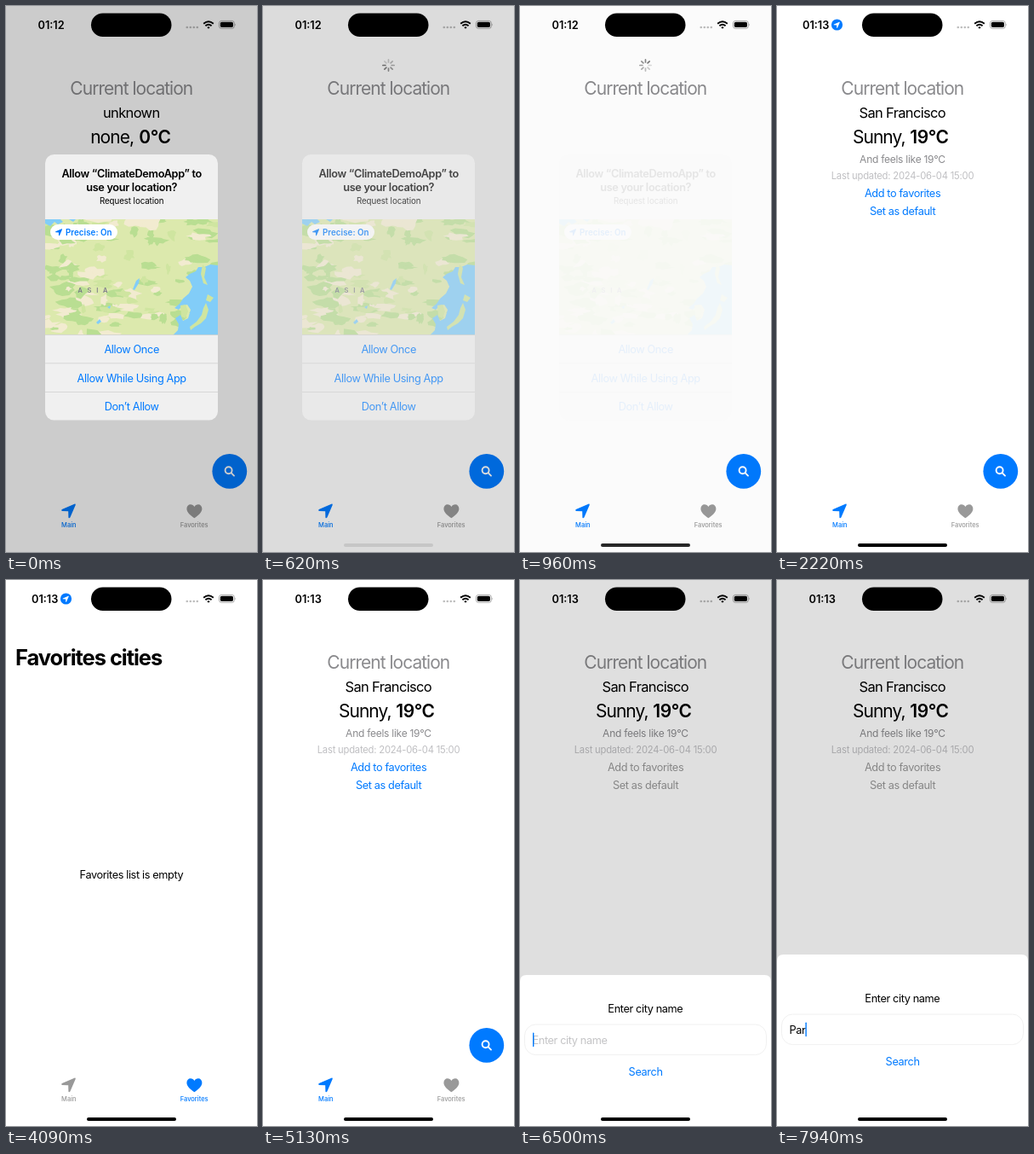
An HTML page for the animation above (8 s loop, 295x640 px).

```html
<!DOCTYPE html>
<html lang="en">
<head>
<meta charset="utf-8">
<title>Weather app</title>
<style>
html, body { margin: 0; width: 100%; height: 100%; overflow: hidden; background: #fff; }
svg { display: block; width: 100vw; height: 100vh; }
text { font-family: Inter, "Liberation Sans", sans-serif; font-optical-sizing: none; white-space: pre; }
</style>
</head>
<body>
<svg id="stage" viewBox="0 0 295 640" xmlns="http://www.w3.org/2000/svg"></svg>
<script>
const LOOP = 8000;
const BLUE = [0, 122, 255], GREY = [153, 153, 153];
const $ = id => document.getElementById(id);
const rgb = c => `rgb(${c.map(Math.round)})`;
const mix = (a, b, k) => rgb(a.map((v, i) => v + (b[i] - v) * k));
const clamp = v => Math.max(0, Math.min(1, v));

// Text styles: size, letter spacing, weight
const STYLE = {
  title: [21, -0.98, 400],
  titleBold: [21, -0.4, 600],
  city: [16.5, -0.66, 400],
  body: [12.76, -0.39, 400],
  bodyBold: [12.76, -0.33, 600],
  callout: [12, -0.26, 400],
  sub: [11.26, -0.22, 400],
  foot: [9.76, -0.08, 400],
  pill: [9.76, 0.05, 600],
  tab: [7.5, 0, 500],
  clock: [12.76, 0, 600],
  large: [25.5, -1.05, 700]
};

function text(style, x, y, str, { fill = '#000', anchor = 'middle', id = '' } = {}) {
  const [size, gap, weight] = STYLE[style];
  return `<text ${id && `id="${id}"`} x="${x}" y="${y}" font-size="${size}" letter-spacing="${gap}" ` +
    `font-weight="${weight}" text-anchor="${anchor}" fill="${fill}">${str}</text>`;
}
const left = (style, x, y, str, opts) => text(style, x, y, str, { anchor: 'start', ...opts });
const arrow = (x, y, k, fill, id = '') =>
  `<path ${id && `id="${id}"`} transform="translate(${x} ${y}) scale(${k})" fill="${fill}" ` +
  `d="M7-8.3Q8.7-8.7 8.3-7L2 7.6Q.7 9.2 0 7.4L-.2.2L-7.6 0Q-9-.8-7.6-2Z"/>`;

function seeded(s) {
  return () => (s = (s * 16807) % 2147483647) / 2147483647;
}

function terrain() {
  const rnd = seeded(417);
  let out = '';
  for (let i = 0; i < 130; i++) {
    const x = 46 + rnd() * 203, y = 250 + rnd() * 135;
    const cream = y > 345 && x < 150 ? 0.7 : 0.22;
    const fill = rnd() < cream ? '#f2ebd0' : rnd() < 0.75 ? '#b9de92' : '#cfe5a0';
    const rx = 3 + rnd() * 13, ry = 2 + rnd() * 6;
    const pts = [];
    for (let a = 0; a < 12; a++) {
      const r = 0.5 + rnd() * 0.7, q = a * Math.PI / 6;
      pts.push((x + Math.cos(q) * rx * r).toFixed(1) + ',' + (y + Math.sin(q) * ry * r).toFixed(1));
    }
    out += `<polygon points="${pts.join(' ')}" fill="${fill}"/>`;
  }
  return out;
}

function mapView() {
  return `<g clip-path="url(#mapClip)">
    <rect x="46" y="250" width="203" height="135.5" fill="#dce9ad"/>${terrain()}
    <g fill="#82cdf8">
      <path d="M249 304L240 303 233 306 226 306 223 311 216 314 211 318 216 322 219 329 215 337 208 343 204 349
        198 354 203 356 207 352 213 350 217 356 214 366 208 369 205 362 199 366 203 373 202 380 196 386H249Z"/>
      <path d="M46 250H64L67 253 61 256 57 253 52 258 46 255ZM74 250H82L79 253Z"/>
      <path d="M149 332L153 322 157 319 156 325 151 333ZM106 371L110 367 112 370 108 373ZM119 353L123 351 122 355Z"/>
    </g>
    <path d="M237 338L244 342 240 347 235 345ZM235 348L238 356 235 366 229 372 222 376 217 380 216 376 224 370 230 362 232 354Z" fill="#cfe5a0"/>
    <path d="M231 303L235 307 233 318 237 327 232 325 229 314Z" fill="#cfe5a0"/>
    <path d="M205 351L211 350 214 358 211 366 206 364Z" fill="#cfe5a0"/>
    ${left('tab', 84.5, 335.5, 'A S I A', { fill: '#6f6a86' }).replace('letter-spacing="0"', 'letter-spacing="1.9"')}
    <rect x="52" y="256" width="79" height="18" rx="9" fill="#fff"/>
    ${arrow(62, 265.3, 0.48, rgb(BLUE))}
    ${left('pill', 70, 268.7, 'Precise: On', { fill: rgb(BLUE) })}
  </g>`;
}

function alertView() {
  const action = (y, str) => text('body', 147.7, y, str, { fill: rgb(BLUE) });
  const rule = y => `<rect x="46" y="${y}" width="203" height=".7" fill="#cdcdcd"/>`;
  return `<rect x="46" y="174" width="203" height="311.5" rx="10.5" fill="#f0f0f0"/>
    ${text('bodyBold', 147.7, 200.6, 'Allow “ClimateDemoApp” to')}
    ${text('bodyBold', 147.7, 217, 'use your location?')}
    ${text('foot', 147.7, 232.4, 'Request location')}
    ${mapView()}${rule(385.3)}${rule(418.5)}${rule(452)}
    ${action(407, 'Allow Once')}${action(440.5, 'Allow While Using App')}${action(473.7, 'Don’t Allow')}`;
}

function statusBar() {
  const dots = [212.8, 216.8, 220.8, 224.8].map(x => `<circle cx="${x}" cy="25" r="1.35"/>`).join('');
  return `<rect x="100" y="8.5" width="94.5" height="27.5" rx="13.75"/>
    ${left('clock', 37.5, 26.6, '01:12', { id: 'clock' })}
    <g id="badge"><circle r="6.6" fill="${rgb(BLUE)}"/>${arrow(-0.3, 0.3, 0.43, '#fff')}</g>
    <g opacity=".25">${dots}</g>
    <g fill="none" stroke="#000" stroke-width="1.9">
      <path d="M232.2 20.7Q238 15.6 243.8 20.7"/><path d="M234.4 23.3Q238 20.2 241.6 23.3"/>
    </g>
    <path d="M236.3 25Q238 23.5 239.7 25L238 26.8Z"/>
    <rect x="250.4" y="17.4" width="18" height="9" rx="2.9" fill="none" stroke="#000" stroke-opacity=".4" stroke-width=".8"/>
    <rect x="251.8" y="18.8" width="15.2" height="6.2" rx="1.7"/>
    <path d="M269.4 20.5Q270.8 21.9 269.4 23.3Z" opacity=".4"/>`;
}

function spinner() {
  let out = '';
  for (let i = 0; i < 8; i++)
    out += `<path d="M0-3.6V-6.6" transform="rotate(${i * 45})" stroke-opacity="${0.25 + i * 0.09}"/>`;
  return `<g id="spin" stroke="#666" stroke-width="1.7" stroke-linecap="round">${out}</g>`;
}

const soft = '#8a8a8d', faint = '#bfbfc2';
$('stage').innerHTML = `
  <defs><clipPath id="mapClip"><rect x="46" y="250" width="203" height="135.5"/></clipPath></defs>
  <rect width="295" height="640" fill="#fff"/>
  <g id="main">
    ${text('title', 147.3, 104, 'Current location', { fill: soft })}
    <g id="blank">
      ${text('city', 147.3, 130.8, 'unknown')}
      ${left('title', 99.2, 160.8, 'none,')}${left('titleBold', 156.2, 160.8, '0°C')}
    </g>
    ${spinner()}
    <g id="report">
      ${text('city', 147.3, 130.8, 'San Francisco')}
      ${left('title', 89, 160.8, 'Sunny,')}${left('titleBold', 156.2, 160.8, '19°C')}
      ${text('callout', 147.5, 183.5, 'And feels like 19°C', { fill: soft })}
      ${text('sub', 147.5, 203.2, 'Last updated: 2024-06-04 15:00', { fill: faint })}
      <g id="links">
        ${text('body', 147.6, 224.2, 'Add to favorites', { fill: 'inherit' }).replace('fill="inherit"', '')}
        ${text('body', 147.6, 245.4, 'Set as default', { fill: 'inherit' }).replace('fill="inherit"', '')}
      </g>
    </g>
    <circle id="fab" cx="262.8" cy="545.4" r="20.4"/>
    <g fill="none" stroke="#fff" stroke-width="1.9" stroke-linecap="round">
      <circle cx="261.6" cy="544.2" r="4"/><path d="M264.8 547.4L268 550.6"/>
    </g>
  </g>
  <g id="favs">
    ${left('large', 11, 100.3, 'Favorites cities')}
    ${text('body', 147.4, 349.8, 'Favorites list is empty')}
  </g>
  <g id="tabMain">${arrow(73.4, 592, 1, 'currentColor')}${text('tab', 73.8, 611.4, 'Main', { fill: 'currentColor' })}</g>
  <g id="tabFavs">
    <path transform="translate(221.4 592.2)" fill="currentColor" d="M0 8C-4 5.2-9 1.6-9-3C-9-6-7-8-4.6-8C-2.6-8-1-7 0-5.2C1-7 2.6-8 4.6-8C7-8 9-6 9-3C9 1.6 4 5.2 0 8Z"/>
    ${text('tab', 221.2, 611.4, 'Favorites', { fill: 'currentColor' })}
  </g>
  <rect id="dim" width="295" height="640"/>
  <g id="alert">${alertView()}</g>
  <g id="sheet">
    <path d="M0 300V7.5Q0 0 7.5 0H287.5Q295 0 295 7.5V300Z" fill="#fff"/>
    <g id="form">
      ${text('body', 147.4, -32.3, 'Enter city name')}
      <rect x="5.5" y="-18" width="284" height="35.6" rx="13" fill="#fff" stroke="#ececec" stroke-width=".8"/>
      ${left('body', 14.5, 4.6, '', { id: 'entry' })}
      <rect id="caret" y="-8.4" width="1.4" height="16.6" rx=".7" fill="${rgb(BLUE)}"/>
      ${text('body', 147.6, 41.5, 'Search', { fill: rgb(BLUE) })}
    </g>
  </g>
  ${statusBar()}
  <rect id="home" x="95" y="630" width="105" height="4" rx="2"/>`;

const RUNS = [[500, 1170, 7], [4690, 5440, 8], [6500, 7000, 6]];
function snap(t) {
  for (const [a, b, n] of RUNS) {
    if (t < a || t >= b) continue;
    const step = (b - a) / (n - 1);
    return a + step * Math.floor((t - a + 6) / step);
  }
  return t;
}
// Critically damped spring, 0 to 1
const spring = (t, start, w) => {
  const x = Math.max(0, t - start) * w;
  return 1 - (1 + x) * Math.exp(-x);
};
const show = (id, on) => $(id).setAttribute('visibility', on ? 'visible' : 'hidden');
const set = (id, name, v) => $(id).setAttribute(name, v);

function draw(ms) {
  const t = snap(ms);
  const asked = t < 500 ? 1 : t >= 1165 ? 0 : 1 - spring(t, 483, 0.0089);
  const rise = t >= 5710 ? 1 : spring(Math.min(t, 5440), 5206, 0.0169);
  const grow = t >= 6995 ? 1 : spring(t, 6500, 0.012);
  const favs = t >= 4090 && t < 4360;
  const loaded = t >= 1165;

  show('main', !favs);
  show('favs', favs);
  for (const [id, on] of [['blank', t < 600], ['spin', t >= 600 && !loaded], ['report', loaded]])
    set(id, 'display', on ? 'inline' : 'none');
  set('spin', 'transform', `translate(147.5 69.5) rotate(${Math.floor(t / 110) * 45 + 90})`);

  const tint = mix(BLUE, GREY, clamp(rise * 1.7));
  set('links', 'fill', tint);
  set('fab', 'fill', mix(BLUE, [200, 210, 225], rise));
  set('tabMain', 'color', favs ? rgb(GREY) : tint);
  set('tabFavs', 'color', favs ? rgb(BLUE) : rgb(GREY));

  set('dim', 'opacity', asked * 0.2 + rise * 0.125);
  set('alert', 'opacity', asked);
  set('home', 'opacity', (1 - asked) ** 2);

  const badge = t < 2220 ? 0 : 1 - clamp((t - 4640) / 330);
  set('clock', 'x', 37.5 - 7.5 * badge);
  $('clock').textContent = t < 2220 ? '01:12' : '01:13';
  set('badge', 'transform', `translate(70.5 22) scale(${badge})`);

  const h = 177 + 24 * grow;
  show('sheet', rise > 0);
  set('sheet', 'transform', `translate(0 ${640 - h * rise})`);
  set('form', 'transform', `translate(0 ${h / 2 - 12.5})`);
  const typed = [7230, 7740, 7940].filter(s => t >= s).length;
  $('entry').textContent = typed ? 'Par'.slice(0, typed) : 'Enter city name';
  set('entry', 'fill', typed ? '#000' : '#c4c4c6');
  set('caret', 'x', [15, 22.4, 29.3, 33.4][typed]);
  set('caret', 'display', t >= 6220 ? 'inline' : 'none');
}

let begin;
function tick(now) {
  begin ??= now;
  draw((now - begin) % LOOP);
  requestAnimationFrame(tick);
}
draw(0);
requestAnimationFrame(tick);
</script>
</body>
</html>
```
